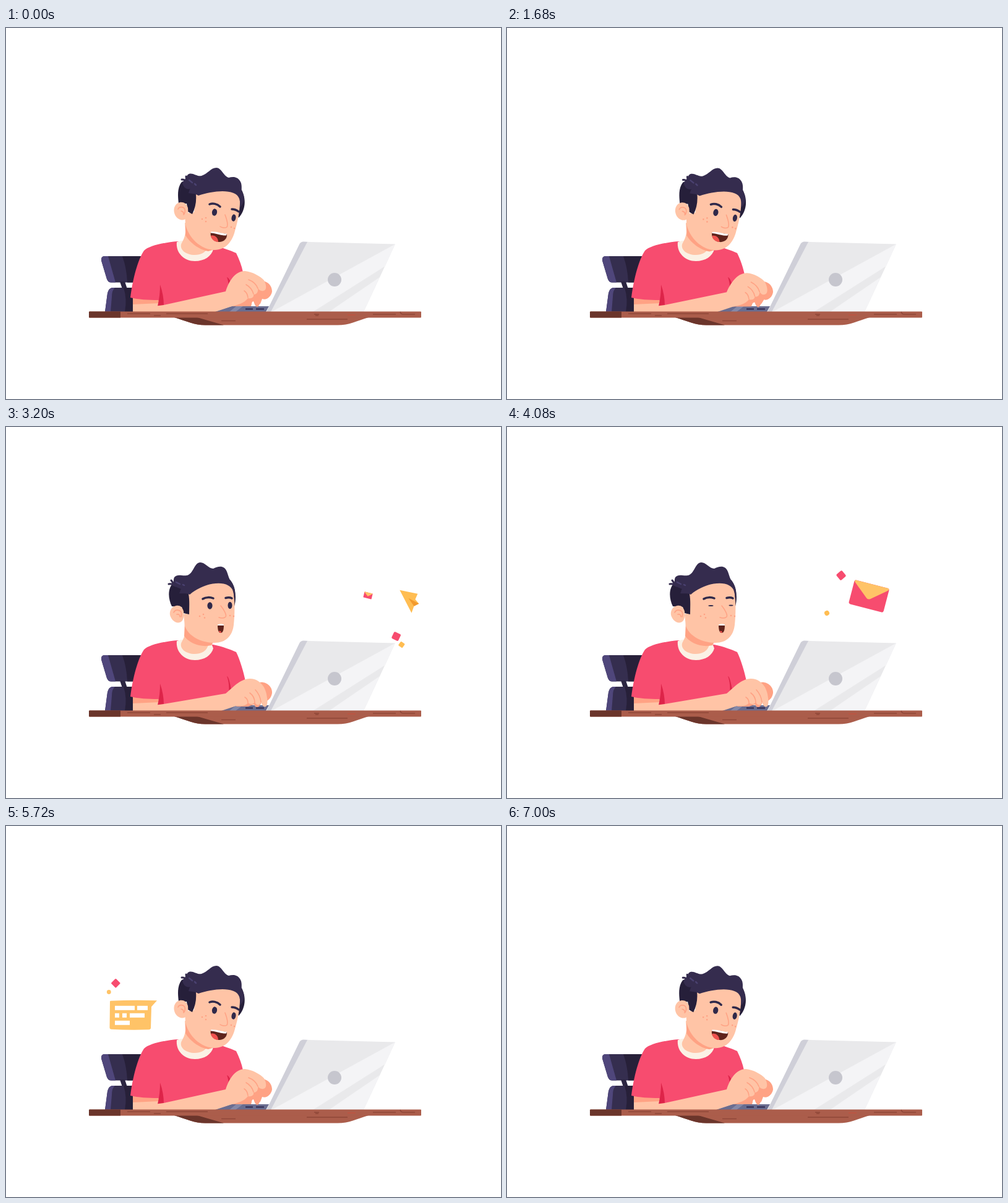
An HTML page that plays this animation: 800 px wide and 600 px high, repeating every 7.04 s.

```html
<!DOCTYPE html>
<html lang="en">
<head>
<meta charset="utf-8">
<title>Boy at a laptop</title>
<style>
html, body { margin: 0; width: 100%; height: 100%; overflow: hidden; background: #fff; }
svg { display: block; width: 100%; height: 100%; }
</style>
</head>
<body>
<svg viewBox="0 0 800 600">
  <g id="chair">
    <path fill="#352e4f" d="M158 369H222L212 411.500H170Q165 411.500 163 406L154.300 377Q153 370 158 369Z"/>
    <path fill="#4f467b" d="M158 369H165L177 411.500H170Q165 411.500 163 406L154.300 377Q153 370 158 369Z"/>
    <path fill="#272039" d="M188 369H222V411.500H196Q195 388 188 369Z"/>
    <path fill="#2b2541" d="M184 410H192L196 422H188Z"/>
    <path fill="#352e4f" d="M173 420H210V459H160L164 429Q166 420 173 420Z"/>
    <path fill="#4f467b" d="M173 420H176Q171 424 171 435L169 459H160L164 429Q166 420 173 420Z"/>
    <path fill="#272039" d="M190 420H210V459H192Q196 438 190 420Z"/>
  </g>
  <g id="left"></g>
  <g id="right"></g>
  <g id="body"></g>
  <g id="head"></g>
  <g>
    <path fill="#6a6d90" d="M336 459L364 450H425L420 459Z"/>
    <path fill="#8589a8" d="M372 450H383L371 459H361Z"/>
    <path stroke="#37335a" stroke-width="2.600" d="M387 454.500H399M404 454.500H417"/>
  </g>
  <g id="arm"></g>
  <g id="laptop">
    <path fill="#cfcfd8" d="M421 459L474 350Q476 345.500 481 345.500L490 346L432 459Z"/>
    <path fill="#e9e9eb" d="M487 346L629 349.500L578 459H428Z"/>
    <path fill="#f4f4f6" d="M629 349.500L613 385L496 459H428L433 457ZM604 403L578 459H522Z"/>
    <circle cx="531" cy="407" r="11" fill="#c6c6ce"/>
  </g>
  <g id="table">
    <path fill="#ab5d4b" d="M272 468H586C566 474 555 480.500 536 480.500H322C305 480.500 291 474 272 468Z"/>
    <path fill="#6b352b" d="M272 468H309L352 480.500H322C305 480.500 291 474 272 468Z"/>
    <rect x="134" y="458.500" width="537" height="10" rx="1" fill="#ab5d4b"/>
    <path fill="#6b352b" d="M135 458.500H185V468.500H135Q134 468.500 134 467V460Q134 458.500 135 458.500Z"/>
    <path fill="none" stroke="#904739" stroke-width="1.400" d="M196 462H233M239 465H250M259 462H326M348 473.500H371M486 471H552M498 463H506M500 465H505M593 463H630M637 459Q638 463 642 463H661"/>
    <path stroke="#c2533f" stroke-width="1.400" d="M552 464H565"/>
  </g>
</svg>
<script>
const LOOP = 7040;
const SKIN = '#ffc4a6', SHADE = '#ffa284', PINK = '#f74c6f', GOLD = '#ffc367', HAIR = '#352c4e', DARK = '#261f3a';
const $ = id => document.getElementById(id);
const clamp = v => Math.min(1, Math.max(0, v));
const span = (t, a, b) => clamp((t - a) / (b - a));
const smooth = k => k * k * (3 - 2 * k);
const out = k => 1 - (1 - k) ** 3;
const lerp = (a, b, k) => a + (b - a) * k;
const ramp = (t, a, b) => smooth(span(t, a, b));
// 0 at both ends of each period, 1 in the middle
const pulse = (t, from, period) => Math.sin(Math.PI * (t - from) / period) ** 2;

function add(parent, tag, attrs) {
  const el = document.createElementNS('http://www.w3.org/2000/svg', tag);
  set(el, attrs);
  return parent.appendChild(el);
}
function set(el, attrs) {
  for (const k in attrs) el.setAttribute(k, attrs[k]);
}
function place(el, x, y, s = 1, r = 0) {
  set(el, { transform: `translate(${x} ${y}) rotate(${r}) scale(${Math.max(0, s)})` });
}

// A path that blends between two poses of equal structure
const NUM = /-?\d+(?:\.\d+)?/g;
function morph(list, parent, style, a, b = a) {
  const el = add(parent, 'path', style), to = b.match(NUM);
  list.push(k => {
    let i = 0;
    el.setAttribute('d', a.replace(NUM, n => lerp(+n, +to[i++], k).toFixed(2)));
  });
  return el;
}
const fill = c => ({ fill: c });
const line = (c, w) => ({ fill: 'none', stroke: c, 'stroke-width': w, 'stroke-linecap': 'round', 'stroke-linejoin': 'round' });

const hand = [], face = [];
const body = $('body'), head = $('head'), arm = $('arm');

// Shirt, collar and neck
add(body, 'path', { fill: SHADE, d: 'M205 435L248 439V450L205 459Z' });
add(body, 'path', { fill: SKIN, d: 'M205 447L248 445V452L205 459Z' });
morph(hand, body, fill(PINK),
  'M201 436C205 405 213 375 223 360C231 352 255 347 277 345L335 352C350 355 363 360 372 364C377 374 381 385 383 395L372 430L255 452L246 440C230 440 213 439 201 436Z',
  'M201 436C205 405 213 375 223 360C231 352 255 347 277 345L335 352C350 355 363 360 372 364C378 376 384 396 387 411L372 434L255 452L246 440C230 440 213 439 201 436Z');
add(body, 'path', { fill: '#dd2449', d: 'M249 415C253 426 255 438 255 449L245 450C248 437 249 426 249 415Z' });
morph(hand, body, fill('#dd2449'), 'M357 403C361 404 365 414 367 425L359 430C361 420 360 411 357 403Z', 'M357 403C360 404 362 414 364 425L360 432C361 420 360 411 357 403Z');
add(body, 'path', { fill: '#fbf1e5', d: 'M276 346C274 364 288 377 305 377C321 377 332 369 335 358L332 350L283 344Z' });
add(body, 'path', { fill: SKIN, d: 'M289 315L290 330C289 340 285 345 283 350C281 359 291 367 305 367C315 367 323 363 326 355L335 338Z' });

// Head
morph(face, head, fill(SHADE),
  'M290 310C298 342 320 358 337 358L327 361C312 359 296 346 290 335Z',
  'M289 315C298 340 320 349 335 348L332 353C315 357 296 350 288 338Z');
morph(face, head, fill(DARK),
  'M381 262C388 276 388 294 376 307C373 300 377 290 375 270Z',
  'M362 247C371 257 373 276 369 290C366 282 366 270 362 255Z');
morph(face, head, fill(SKIN),
  'M306 270L304 298L289 300L290 318C297 345 320 359 337 359C355 359 366 345 370 328C375 312 379 290 378 275C372 255 330 254 306 270Z',
  'M295 270L294 300L287 303L289 322C297 342 320 349 337 349C355 349 366 338 368 320C370 300 370 280 367 262C355 243 310 250 295 270Z');
morph(face, head, fill(DARK),
  'M284 249C276 259 278 274 279 284L292 284L294 297L301 301C306 291 308 281 307 269L300 244Z',
  'M267 256C261 266 263 280 268 290L284 291L287 301L296 303C296 291 297 281 295 270L284 248Z');
morph(face, head, fill(HAIR),
  'M285 249C290 246 291 240 294 237C301 232 308 241 316 239C326 236 331 226 340 226C348 226 352 240 360 242C367 240 376 240 380 251C382 259 379 262 383 268C386 275 385 284 378 290C379 284 378 280 377 276C371 259 335 263 311 271C304 267 300 268 295 267C296 264 296 262 298 260C292 262 286 258 285 249Z',
  'M268 256C272 253 270 247 272 243C278 236 287 243 295 239C303 235 305 219 314 219C322 219 327 229 335 229C342 226 352 222 357 234C360 242 360 245 364 250C369 257 371 265 370 272C370 277 370 280 369 282C369 275 368 268 366 263C357 246 320 251 297 271C290 268 286 270 280 269C282 266 281 264 283 262C277 264 270 263 268 256Z');
morph(face, head, line(HAIR, 3), 'M284 245Q290 245 294 250M291 240Q291 245 295 249', 'M263 254Q269 253 274 257M267 248Q269 252 274 255');
morph(face, head, line('#4a4170', 2.5), 'M296 246L301 250M305 252L307 254', 'M275 251L281 254M286 255L288 256');
morph(face, head, fill(SKIN),
  'M294 291C292 284 287 281 281 282C274 283 270 291 272 299C274 307 281 312 288 310C293 308 295 302 294 291Z',
  'M287 298C285 291 281 288 275 289C268 290 264 297 265 304C267 312 274 318 281 316C287 314 288 306 287 298Z');
morph(face, head, line(SHADE, 1.6), 'M278 293C280 288 287 289 289 293C290 296 289 299 288 301M283 296Q288 297 287 302', 'M271 300C273 295 280 295 283 299C284 302 284 304 283 307M276 303Q281 302 281 307');
morph(face, head, line('#2f294a', 3.5), 'M329 285C334 283 341 284 346 289M365 293Q371 293 376 297', 'M318 278C323 275 330 275 335 277M355 276.500Q361 275 365 277');
morph(face, head, line(SHADE, 1.5), 'M354 302C357 310 359 319 357 322C354 324 349 323 346 321', 'M347 289C352 295 357 304 355 307C352 310 347 309 344 308');
morph(face, head, line(SHADE, 2.6),
  'M317 309h0.010M323 307h0.010M323 313h0.010M364 322h0.010M369 324h0.010',
  'M313 306h0.010M319 303h0.010M321 308.500h0.010M362 305h0.010M368 306h0.010');
const eyes = [[337, 298, 329.5, 289, 4.1], [368, 307, 362, 288.5, 3.5]].map(p =>
  ({ p, el: add(head, 'ellipse', { fill: '#2f294a', rx: p[4], ry: 5.7 }) }));

const mouth = add(head, 'g', {});
morph(face, mouth, fill('#5e231c'),
  'M331 330C339 329 350 333 357 333C358 341 351 347 343 346C335 345 329 338 331 330Z',
  'M342 320C345 319 350 319 352 320C352 327 351 333 347 333C343 333 342 327 342 320Z');
morph(face, mouth, fill('#f0524f'),
  'M331 336C337 334 343 339 343 346C337 346 332 342 331 336Z',
  'M344 330C346 329 348 330 348 333C346 333 344 332 344 330Z');
morph(face, mouth, fill('#fff'),
  'M331 329.500C339 328 350 333 357 332.500L356 335.500C349 336 339 332 331 331.500Z',
  'M342 319.500C345 318 350 318 352 319.500L352 321C349 321 345 321 342 321Z');

// Hands
morph(hand, arm, fill(SHADE),
  'M404 414C417 403 430 414 430 426C429 434 421 441 414 438L411 446C408 448 404 446 402 443L399 430Z',
  'M402 416C416 407 431 418 430 430C429 438 424 442 420 444L412 446C410 447 404 447 402 446L399 430Z');
morph(hand, arm, fill(SHADE),
  'M360 450L396 450C398 446 396 443 400 442C402 448 404 451 406 451C409 451 410 445 412 440L412 424L385 420Z',
  'M372 452L390 452C393 452 394 450 401 449C402 452 404 453 406 453C409 453 410 450 412 448L412 430L385 420Z');
morph(hand, arm, fill(SKIN),
  'M205 459C222 452 240 450 255 448L355 426C360 410 370 393 386 393C398 394 412 402 417 408C421 415 422 424 416 425C411 426 409 423 407 421C408 427 405 431 400 431C401 436 396 438 391 437C385 445 374 448 362 451L338 459Z',
  'M205 459C222 452 240 450 255 448L355 431C365 423 378 407 394 407C405 407 412 413 417 421C422 430 424 447 421 451C418 455 414 451 412 445C410 451 405 451 402 445C399 450 394 448 391 446C387 452 379 451 372 451L348 459Z');
morph(hand, arm, line(SHADE, 1.6),
  'M392 407Q403 411 407 421M388 415Q397 420 400 430M385 425Q390 428 391 436',
  'M403 425Q411 434 412 445M394 430Q402 436 402 446M386 437Q391 440 391 446');

// Things to the right
const right = $('right');
const plane = add(right, 'g', {});
add(plane, 'path', { fill: '#ffbd52', d: 'M-16 -17L13 -11L9 -2L15 5L7 9L3 20Z' });
add(plane, 'path', { fill: '#f39a2d', d: 'M-2 -4L15 5L7 9Z' });
const mail = add(right, 'g', {});
add(mail, 'rect', { x: -29, y: -20, width: 58, height: 40, rx: 3, fill: PINK });
add(mail, 'path', { fill: GOLD, d: 'M-27 -20H27Q30 -19 27 -16L3 4Q0 6 -3 4L-27 -16Q-30 -19 -27 -20Z' });
const bitPink = add(right, 'rect', { x: -6, y: -6, width: 12, height: 12, rx: 2, fill: PINK });
const bitGold = add(right, 'rect', { x: -4, y: -4, width: 8, height: 8, fill: '#ffbd52' });
const burst = add(right, 'path', line(PINK, 5));

// Things to the left
const left = $('left');
const streak = add(left, 'path', { ...line(GOLD, 6), 'stroke-linecap': 'butt', d: 'M271 265C264 277 253 285 238 288', pathLength: 1 });
streak.style.strokeLinecap = 'round';
const bubble = add(left, 'g', {});
add(bubble, 'path', { fill: GOLD, d: 'M-74 0.500Q-36 -1.500 1 0L-8 10L-9 45Q-10 47 -12 47Q-42 48 -73 46.500Q-75.500 46 -75.500 44L-75 2Q-75 0.500 -74 0.500Z' });
const words = [[176, 0, 32], [212, 0, 17], [176, 1, 7], [188, 1, 7], [200, 1, 24], [176, 2, 24]].map(([x, row, w]) =>
  ({ w, el: add(bubble, 'rect', { x: x - 243, y: 8.5 + row * 12, height: 7, fill: '#fff' }) }));
const diamond = add(left, 'rect', { x: -5.5, y: -5.5, width: 11, height: 11, rx: 1.5, fill: PINK });
const dot = add(left, 'circle', { r: 3.4, fill: GOLD });

function drawBoy(t) {
  let press = 1;
  if (t < 2320) press = pulse(t, 0, 273);
  else if (t > 4953) press = t < 6640 ? pulse(t, 5720, 306.7) : 0;
  hand.forEach(f => f(press));

  const awe = ramp(t, 2960, 3180) - ramp(t, 4520, 4710);
  face.forEach(f => f(awe));
  const bob = t < 2160 ? pulse(t, 0, 270) : t > 5192 ? pulse(t, 5720, 264) : 0;
  place(head, bob, bob * 0.9);
  set(mouth, { transform: `translate(0 ${bob * 16.6}) scale(1 ${1 - bob * 0.05})` });

  const open = 1 - 0.88 * Math.sin(Math.PI * span(t, 3960, 4160));
  for (const { p, el } of eyes) {
    const tilt = lerp(10, 0, awe);
    set(el, { transform: `translate(${lerp(p[0], p[2], awe)} ${lerp(p[1], p[3], awe)}) rotate(${tilt}) scale(1 ${open})` });
  }
}

function drawRight(t) {
  const k = span(t, 2980, 3540), q = 1 - k;
  const bez = (a, b, c) => q * q * a + 2 * q * k * b + k * k * c;
  place(plane, bez(636, 682, 600), bez(380, 218, 240), k === 1 ? 0 : Math.min(span(k, 0, 0.25), span(q, 0, 0.3)), (0.393 - k) * 60);

  const grow = out(span(t, 3160, 3640)), shrink = 1 - ramp(t, 4400, 4560);
  const sway = Math.sin(Math.PI * 2 * span(t, 3800, 4400));
  place(mail, 585, lerp(272, 274, grow) - 2 * sway, grow * shrink, 14 + 3 * sway);

  const fly = ramp(t, 3080, 3640), show = span(t, 3080, 3180);
  place(bitPink, lerp(643, 540, fly), lerp(352, 240, fly), show * (1 - ramp(t, 4280, 4500)), lerp(10, 140, fly));
  place(bitGold, lerp(656, 517, fly), lerp(359, 301, fly), show * (1 - ramp(t, 4720, 4920)), lerp(20, 150, fly));
  set(bitGold, { rx: lerp(1, 4, fly) });

  const a = lerp(2, 20, out(span(t, 4540, 4920))), b = lerp(2, 20, out(span(t, 4480, 4860)));
  const near = Math.min(a, b) - 5, far = b - 2;
  const on = t > 4540 && t < 4900;
  const arms = [[1, 0], [-1, 0], [0, 1], [0, -1]].map(([x, y]) =>
    `M${585 + x * Math.max(2, near)} ${275 + y * Math.max(2, near)}L${585 + x * Math.max(2, far)} ${275 + y * Math.max(2, far)}`);
  set(burst, { d: arms.join(''), visibility: on ? 'visible' : 'hidden', 'stroke-width': 5 * (1 - ramp(t, 4740, 4900)) });
}

function drawLeft(t) {
  const tip = ramp(t, 4580, 4700), tail = ramp(t, 4720, 4860);
  set(streak, { 'stroke-dasharray': `${Math.max(0, tip - tail)} 3`, 'stroke-dashoffset': -tail, visibility: tip > tail ? 'visible' : 'hidden' });

  const size = out(span(t, 4680, 5240)) * (1 - ramp(t, 6600, 6920));
  place(bubble, 243, 282.3, size);
  words.forEach(({ w, el }, i) => set(el, { width: w * ramp(t, 4960 + i * 90, 5140 + i * 90) }));

  const fly = out(span(t, 4840, 5200)), away = ramp(t, 6000, 6560);
  const scale = fly * (1 - away);
  place(diamond, lerp(200, 177.3, fly) - 26 * away, lerp(288, 254.3, fly) - 10 * away, scale, 45 + 90 * away);
  place(dot, lerp(195, 166.3, fly) - 30 * away, lerp(290, 268.5, fly) + 3 * away, scale);
}

function draw(t) {
  drawBoy(t);
  drawRight(t);
  drawLeft(t);
}

const start = performance.now();
function tick(now) {
  draw(Math.max(0, now - start) % LOOP);
  requestAnimationFrame(tick);
}
draw(0);
requestAnimationFrame(tick);
</script>
</body>
</html>
```
